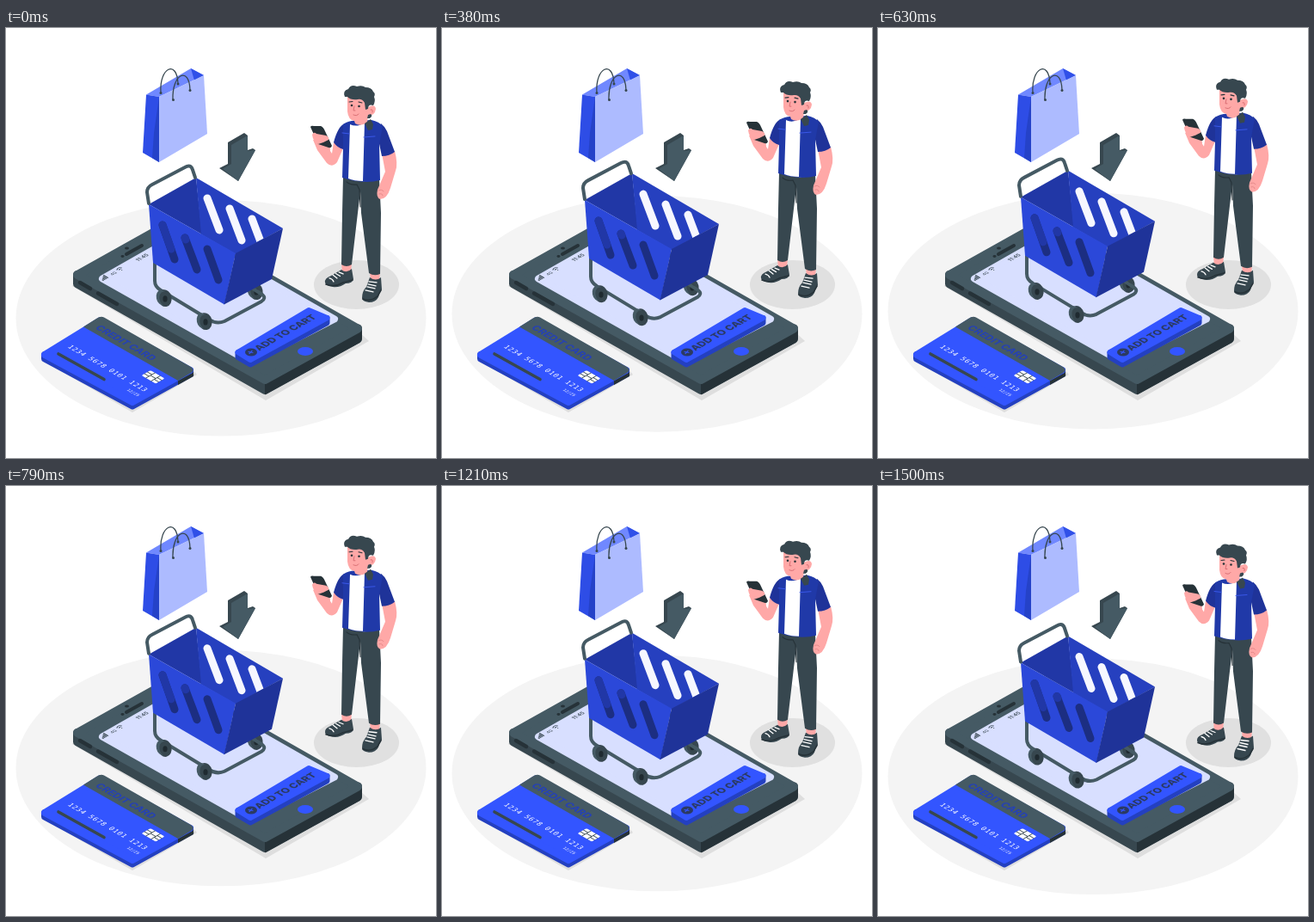
Recreate the animation shown at these times as an HTML page. Size 500 by 500 pixels, loop 1.54 s.

```html
<!DOCTYPE html>
<html lang="en">
<head>
<meta charset="utf-8">
<title>Add to cart</title>
<style>
  html, body { margin: 0; width: 100%; height: 100%; overflow: hidden; background: #fff; }
  svg { display: block; width: 100%; height: 100%; }
  .line { fill: none; stroke-linecap: round; stroke-linejoin: round; }
  .soft { stroke-linejoin: round; }
  text { font-family: Inter, sans-serif; }
  .mono { font-family: "DejaVu Sans Mono", monospace; fill: #fff; }
</style>
</head>
<body>
<svg viewBox="0 0 500 500">
  <defs>
    <clipPath id="backWall"><path d="M221 174L322 233L267 262L227 239Z"/></clipPath>
    <g id="wheel">
      <ellipse cx="1.5" cy=".5" rx="8" ry="10" fill="#37474f" transform="rotate(-12)"/>
      <ellipse cx="-1.5" cy="-1" rx="6.5" ry="9" fill="#455a64" transform="rotate(-12)"/>
      <ellipse cx="1.5" cy="1" rx="6.2" ry="8.4" fill="#37474f" transform="rotate(-12)"/>
      <ellipse cx="2" cy="1" rx="2.6" ry="3.6" fill="#1f2a30"/>
    </g>
  </defs>

  <ellipse class="float" cx="250" cy="337.3" rx="238.5" ry="137.3" fill="#f4f4f4"/>
  <ellipse cx="407.5" cy="298.5" rx="49.5" ry="28.5" fill="#e0e0e0"/>

  <g class="float" id="man">
    <path fill="#ffa8a7" d="M390 272h12l-1 14h-10zM423 283h12l-1 12h-10z"/>
    <path fill="#37474f" d="M371 296Q370 291 378 288L390 281Q396 286 402 280L404 292Q403 297 395 297Q388 302 380 301Q372 300 371 296ZM414 314Q414 306 419 301L423 290Q430 295 436 290L437 304Q434 309 433 313Q430 319 422 319Q414 318 414 314Z"/>
    <path class="line" stroke="#263238" stroke-width="1.6" d="M372 298Q382 302 392 296L403 293M415 315Q424 319 432 312L436 305"/>
    <path class="line" stroke="#fff" stroke-width="1.3" d="M380 287l5 4M383.500 285.500l5 3M387 284l5 2M376 291q4 1 5 4M420 301l9 2M421 298l9 2M422 295l9 1M418 305l9 2"/>
    <path fill="#37474f" d="M392 173Q412 182 434 176L436 215L435 286Q428 289 422 285L413 215L412 190L409 215L402 275Q396 279 390 275L391 215Z"/>
    <path class="line" stroke="#263238" stroke-width="1.1" d="M396 179Q400 183 408 182L411 188L412 208"/>
    <path fill="#ffa8a7" d="M437 146L452 143Q456 158 453 166L447 186Q443 199 435 199Q430 197 432 188L441 167Z"/>
    <path class="line" stroke="#e08385" stroke-width=".8" d="M433 189q4-2 6 1M434 193q4-1 4 2"/>
    <path fill="#ffa8a7" d="M381 133L392 140L385 156Q379 163 373 157L362 142L357 130L376 131L377 143L379 146Z"/>
    <path fill="#263238" d="M354 115Q355 113 358 114L366 114Q369 115 371 120L379 137Q378 140 375 139L363 135Z"/>
    <path fill="#ffa8a7" d="M356 124Q358 120 361 123L372 125Q376 127 375 130L369 133L363 135Q357 132 356 124Z"/>
    <path fill="#1f3399" d="M394 111Q386 114 381 133Q385 139 392 141ZM436 111Q440 114 443 120L452 144Q446 149 437 149L433 130Z"/>
    <path fill="#2039a8" d="M392 112Q400 107 408 108L425 107Q434 109 438 114L434 135L435 177Q415 182 391 174L392 140Z"/>
    <path fill="#fff" d="M400 112Q408 116 417 110L415 178Q405 178 398 175Z"/>
    <path fill="#ffa8a7" d="M397 80L419 80L421 92Q429 88 430 94Q429 102 421 102L420 110Q412 115 406 111L405 108Q398 107 397 97Z"/>
    <path fill="#37474f" d="M417 111L424 106L427 112L426 118L421 119Z"/>
    <path class="line" stroke="#3d5bf0" stroke-width=".9" d="M391 122l8 1M416 127l13-1"/>
    <path fill="#37474f" d="M394 80Q391 73 398 71Q401 65 408 68Q414 66 418 69Q425 69 427 74Q430 76 428 80Q430 85 427 90Q421 88 421 94L418 95L417 87Q414 82 409 83Q401 84 397 80ZM421 101L424 100Q427 102 423 105L420 105Z"/>
    <g fill="#263238"><circle cx="402" cy="90" r="1.3"/><circle cx="410.500" cy="91" r="1.3"/></g>
    <path class="line" stroke="#263238" stroke-width="1.1" d="M399 86l4-.5M410 86l4 1"/>
    <path class="line" stroke="#d96f74" stroke-width="1" d="M405 91l-1 5l2 0M404 101q4 2 6-1M424 95q3-1 2 3"/>
  </g>

  <g id="phone">
    <path fill="#dedede" d="M77 300L302 433L422 364L411 354L301 415L84 292Z"/>
    <path class="soft" fill="#37474f" stroke="#37474f" stroke-width="10" d="M83 287V297.500L301 421L409 361.500V349.500Z"/>
    <path fill="#263238" d="M301 414V426.500L411 366Q414 364 414 360V350Z"/>
    <path class="soft" fill="#455a64" stroke="#455a64" stroke-width="10" d="M83 287L192 226L409 349.500L301 409Z"/>
    <path class="line" stroke="#263238" stroke-width="4.500" d="M86 296L98 303M107 308.500L129 321"/>
    <path class="soft" fill="#d8dfff" stroke="#d8dfff" stroke-width="8" d="M112 291.500L206 238L382 338.500L284 388.500Z"/>
    <path class="line" stroke="#263238" stroke-width="4" d="M140 263L158 253"/>
    <g fill="#263238"><ellipse cx="140.500" cy="256" rx="2.500" ry="1.600"/><ellipse cx="135.500" cy="265.500" rx="2" ry="1.400"/></g>
    <g fill="#37474f" transform="matrix(.866 -.5 .866 .5 113 294)">
      <path d="M0 0v-2h1.300v2zM2 0v-3.500h1.300v3.500zM4 0v-5h1.300v5zM6 0v-6.500h1.300v6.500z"/>
      <text x="12" y="0" font-size="5">4G</text>
      <path class="line" stroke="#37474f" stroke-width="1" d="M22-3.500q3-2.500 6 0M23.500-2q1.500-1.500 3 0M25 0h.1"/>
      <text x="46" y="1" font-size="6" font-weight="600">11:45</text>
    </g>
    <ellipse cx="348" cy="376" rx="9" ry="5" fill="#3355ff"/>
    <path class="soft" fill="#2440c0" stroke="#2440c0" stroke-width="6" d="M269.500 377V383L284 391.500L373.500 343V337Z"/>
    <path class="soft" fill="#3355ff" stroke="#3355ff" stroke-width="6" d="M269.500 377L352 328L373.500 337L284 386Z"/>
    <g fill="#2b3a62">
      <ellipse cx="285" cy="377" rx="7" ry="4.500"/>
      <text transform="matrix(.866 -.5 .866 .5 294.500 375.500)" font-size="11.300" font-weight="800">ADD TO CART</text>
    </g>
    <path class="line" stroke="#3355ff" stroke-width="1.200" d="M282 376.500l5 1M286 375.500l-3 3"/>
  </g>

  <g id="card">
    <path fill="#dedede" d="M40 385L147 447L222 403L214 394L145 436Z"/>
    <path class="soft" fill="#2440c0" stroke="#2440c0" stroke-width="8" d="M45 380V384.500L147 439.500L214 402.500V398Z"/>
    <path fill="#263238" d="M200 410L218 399V402Q219 405 216 406L200 415Z"/>
    <path class="soft" fill="#3355ff" stroke="#3355ff" stroke-width="8" d="M45 380L110 340L214 398L147 435Z"/>
    <path fill="#455a64" d="M90 347.500L105 338Q110 334.500 114 336.500L215 394Q220 397.500 216 400.500L200 410Z"/>
    <text transform="matrix(.866 .5 -.866 .5 103 349)" font-size="11.300" font-weight="700" fill="#2440b8">CREDIT CARD</text>
    <text class="mono" transform="matrix(.866 .5 -.866 .5 71 371)" font-size="8" letter-spacing=".68">1234 5678 0101 1213</text>
    <text class="mono" transform="matrix(.866 .5 -.866 .5 140 421)" font-size="5">12/25</text>
    <path class="line" stroke="#37474f" stroke-width="3.600" d="M61 379L114 408.500"/>
    <g transform="matrix(.866 .5 -.866 .5 168 398)">
      <rect width="19" height="12" rx="1.500" fill="#fff"/>
      <path class="line" stroke="#37474f" stroke-width=".9" d="M0 4h6M0 8h6M13 4h6M13 8h6M6 0v12M13 0v12M6 6h7"/>
    </g>
  </g>

  <g class="float" id="cart">
    <use href="#wheel" x="289" y="306"/>
    <path class="line" stroke="#455a64" stroke-width="4" d="M173 270V294Q173 301 180 305L236 339Q245 345 254 341L297 318Q303 314 298 310L284 301"/>
    <use href="#wheel" x="183" y="314"/>
    <use href="#wheel" x="230" y="341"/>
    <path fill="#2137a6" d="M166 205L221 174L228 240Z"/>
    <path fill="#2640bf" d="M221 174L322 233L267 263L227 240Z"/>
    <path class="line" stroke="#f6f7ff" stroke-width="9" clip-path="url(#backWall)" d="M234 198L248 235M260 210L274 247M286 222L300 259"/>
    <path fill="#2b48d9" d="M166 205L267 262L254 321.500L171 273Z"/>
    <path fill="#1f3399" d="M267 262L322 233L309 292L253.500 321.500Z"/>
    <path class="line" stroke="#1c2e82" stroke-width="9" d="M182 229L196 269M208 244L222 281M234 257L247 293"/>
    <path class="line" stroke="#2137a6" stroke-width="9" d="M182 229L192 257M208 244L209 246"/>
    <path class="line" stroke="#455a64" stroke-width="4" d="M166 204L164 191Q164 185 170 182L208 162Q215 158 217 165L220 174"/>
  </g>

  <g id="bag">
    <path fill="#7088ff" d="M163 77.500L215 47L230 55L178 80Z"/>
    <path fill="#3050e8" d="M215 47L230 55L219 61Z"/>
    <path class="line" stroke="#37474f" stroke-width="1.300" d="M180 75C178 46 199 36 200 65"/>
    <path fill="#2e4de6" d="M163 77.500L178 80V156L159 145Z"/>
    <path fill="#2542c8" d="M178 80V156L170 151L172 122Z"/>
    <path fill="#adbbff" d="M178 80L230 55L234 123L178 156Z"/>
    <path class="line" stroke="#37474f" stroke-width="1.300" d="M194 83C193 53 213 44 214 72"/>
    <g fill="#37474f"><circle cx="180" cy="75.500" r="1.500"/><circle cx="200" cy="65" r="1.500"/><circle cx="194.500" cy="83.500" r="1.500"/><circle cx="214" cy="72.500" r="1.500"/></g>
  </g>

  <g id="arrow">
    <path fill="#37474f" d="M258 133L277 122L281 125V142L287 140L290 142L270 178L248 163L258 158Z"/>
    <path fill="#455a64" d="M262 136L281 125V143L290 142L270 178L252 164L262 158Z"/>
  </g>
</svg>
<script>
  const FPS = 24, STEPS = 37, LOOP = 1540, LIFT = 10;
  const floating = document.querySelectorAll('.float');

  function draw(now) {
    const step = Math.min(STEPS - 1, Math.floor((now % LOOP) * FPS / 1000));
    const phase = (step + 1) / STEPS;
    const y = LIFT * (Math.abs(2 * phase - 1) - 1) + 0.5;
    floating.forEach(part => part.setAttribute('transform', `translate(0 ${y})`));
    requestAnimationFrame(draw);
  }
  draw(performance.now());
</script>
</body>
</html>
```
